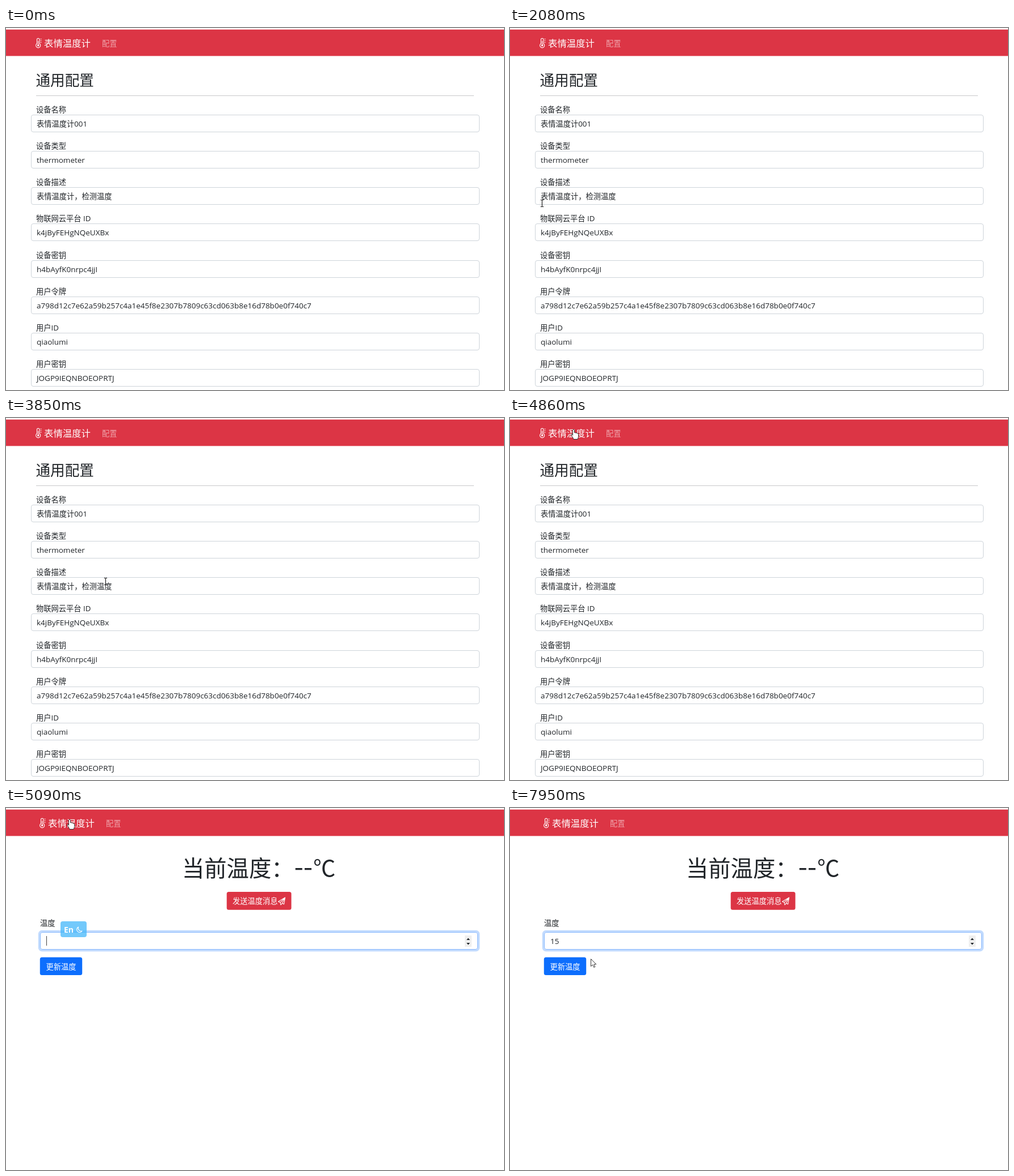
An HTML page for the animation above (8 s loop, 877 by 639 pixels).

```html
<!DOCTYPE html>
<html lang="zh-CN">
<head>
<meta charset="utf-8">
<style>
  html, body { margin: 0; width: 100%; height: 100%; overflow: hidden; background: #fff; }
  svg { display: block; font: 13.25px "Open Sans", "Noto Sans CJK SC", "Noto Sans CJK", sans-serif; fill: #212529; }
  text { white-space: pre; }
  .latin { font-size: 13.5px; }
  .title { font-family: "Noto Sans CJK SC", "Noto Sans CJK", sans-serif; font-weight: 350; }
  .white { fill: #fff; }
  .line { fill: none; stroke: #fff; stroke-width: 1.1; stroke-linejoin: round; stroke-linecap: round; }
  .cursor { fill: #fff; stroke: #222; stroke-width: .9; stroke-linejoin: round; }
</style>
</head>
<body>
<svg width="877" height="639" viewBox="0 0 877 639">
  <rect y="2.7" width="877" height="46.7" fill="#dc3545"/>
  <g id="nav" class="white">
    <path class="line" d="M54.5 27.5V20.5a2.2 2.2 0 0 1 4.4 0v7a4 4 0 1 1-4.4 0zM56.7 23v7M61 19.5h1M61 22.5h1M61 25.5h1"/>
    <circle cx="56.7" cy="30.8" r="1.7"/>
    <text x="67" y="33" font-size="16.4">表情温度计</text>
    <text x="169" y="32" fill-opacity=".55">配置</text>
  </g>

  <g id="config">
    <text class="title" x="52.5" y="101.5" font-size="25.6">通用配置</text>
    <path d="M53 119.5H824" stroke="#c8c9ca"/>
  </g>

  <g id="home">
    <g class="title" font-size="39.3">
      <text x="310" y="121">当前温度：</text>
      <text x="507.5" y="121" font-size="47">--</text>
      <text x="541" y="121">℃</text>
    </g>
    <rect x="388.7" y="148" width="113.8" height="31.7" rx="3.5" fill="#dc3545"/>
    <text class="white" x="399" y="169">发送温度消息</text>
    <path class="line" d="M491.5 158L479.5 165.2 483 166.8 484 171 486.3 168.3 489.5 169.7ZM483 166.8L491.5 158 486.3 168.3"/>
    <text x="60" y="208">温度</text>
    <rect id="ring" x="58.5" y="217.5" width="774" height="34" rx="5" fill="none" stroke="#c2dbfe" stroke-width="3.5"/>
    <rect id="field" x="60.5" y="219.5" width="770" height="30" rx="3.5" fill="#fff"/>
    <rect x="808" y="225" width="12" height="20" fill="#efefef"/>
    <path d="M811 233l3-3.5 3 3.5zM811 238l3 3.5 3-3.5z"/>
    <text id="typed" class="latin" x="71" y="240"></text>
    <path id="caret" d="M.5 226v17" stroke="#444"/>
    <rect x="59.8" y="263.5" width="74.4" height="31.5" rx="3.5" fill="#0d6efd"/>
    <text class="white" x="70.5" y="284.5">更新温度</text>
    <g id="badge">
      <rect x="96" y="200" width="46" height="28" rx="4" fill="#47b8fa" fill-opacity=".76"/>
      <text class="white" x="102" y="220" font-size="14" font-weight="700">En</text>
      <path class="line" d="M127.5 210a5 5 0 1 0 6.5 7a5.3 5.3 0 0 1-6.5-7z"/>
    </g>
  </g>

  <g id="pointer">
    <path id="arrow" class="cursor" d="M.5.5V13.5L3.6 10.7 5.7 15.3 7.8 14.4 5.8 9.9H9.8Z"/>
    <path id="beam" d="M-2.5-6h2l.5.5.5-.5h2M0-5.5v11M-2.5 6h2l.5-.5.5.5h2" fill="none" stroke="#000"/>
    <path id="hand" class="cursor" d="M-1.5 1.2Q0-1 1.5 1.2V6Q3 5 4 6.5 5.5 5.5 6.3 7.2 8.5 6.7 8.5 9V12.5Q8.5 14.5 7 17.5H0Q-1.2 14-4 10.5-4.5 8.5-3.2 8.2L-1.5 10.5Z"/>
  </g>
</svg>
<script>
const $ = id => document.getElementById(id);
const show = (id, on) => $(id).setAttribute('display', on ? 'inline' : 'none');
const move = (id, x, y) => $(id).setAttribute('transform', `translate(${x} ${y})`);

const LOOP = 8000, STEP = 77.1, PITCH = 64.15;
const HOME_AT = 4940, ORBIT_FROM = 520, ORBIT_TO = 3400, ORBIT = 1430;

const fields = [
  ['设备名称', '表情温度计001'],
  ['设备类型', 'thermometer'],
  ['设备描述', '表情温度计，检测温度'],
  ['物联网云平台 ID', 'k4jByFEHgNQeUXBx'],
  ['设备密钥', 'h4bAyfK0nrpc4jjI'],
  ['用户令牌', 'a798d12c7e62a59b257c4a1e45f8e2307b7809c63cd063b8e16d78b0e0f740c7'],
  ['用户ID', 'qiaolumi'],
  ['用户密钥', 'JOGP9IEQNBOEOPRTJ']
];
$('config').innerHTML += fields.map(([label, value], i) => {
  const y = Math.round(153 + PITCH * i);
  return `<text x="53" y="${y - 4.5}">${label}</text>
    <rect x="44.5" y="${y + .5}" width="789" height="30" rx="3.5" fill="#fff" stroke="#ced4da"/>
    <text x="54" y="${y + 21}" class="${/^\w+$/.test(value) ? 'latin' : ''}">${value}</text>`;
}).join('');

// Wide loops over the left half of the form
const orbit = t => [
  112 - 107 * Math.cos(2 * Math.PI * (t - 885) / ORBIT),
  317 - (t - ORBIT_FROM) / 220 + 148 * Math.sin(Math.PI * (t - 600) / ORBIT) ** 4
];

// Eased moves after the loops: start, end, destination
const glides = [
  [3460, 3850, [175.5, 288.5]],
  [3850, 4310, [112, 20]],
  [5320, 5550, [291, 190]],
  [5550, 5625, [205.5, 236.5]],
  [7640, 7945, [142, 266]]
];

function pointerAt(t) {
  if (t < ORBIT_FROM) return t >= 70 && t < 140 ? [389, 519] : null;
  const now = Math.max(ORBIT_FROM, Math.floor((t + 5) / STEP) * STEP);
  let at = orbit(Math.min(now, ORBIT_TO));
  for (const [start, end, to] of glides) {
    const k = Math.min(1, Math.max(0, (now - start) / (end - start)));
    at = at.map((v, i) => v + (to[i] - v) * k * k * (3 - 2 * k));
  }
  return at;
}

function shapeAt(x, y, home) {
  if (y < 49) return x > 52 && x < 150 ? 'hand' : 'arrow';
  const inField = home
    ? x > 60 && y > 219 && y < 251
    : x > 44 && y > 153 && (y - 153) % PITCH < 31;
  return inField ? 'beam' : 'arrow';
}

function draw(t) {
  const home = t >= HOME_AT;
  show('config', !home);
  show('home', home);
  move('nav', home ? 7 : 0, 0);

  const focus = Math.min(1, Math.max(0, (t - HOME_AT) / 150));
  $('ring').setAttribute('opacity', focus);
  $('field').setAttribute('stroke', focus < .5 ? '#ced4da' : '#86b7fe');

  const typed = t < 6800 ? '' : t < 6950 ? '1' : '15';
  $('typed').textContent = typed;
  show('caret', t >= 5090 && t < 5630 || t >= 6010 && t < 6550 || t >= 6800 && t < 7570);
  move('caret', 71 + 7.5 * typed.length, 0);
  show('badge', t >= 5090 && t < 7020);
  move('badge', t < 6870 ? 0 : 7.5, 0);

  const at = pointerAt(t);
  show('pointer', at);
  if (!at) return;
  const shape = shapeAt(...at, home);
  for (const id of ['arrow', 'beam', 'hand']) show(id, id === shape);
  move('pointer', ...at.map(v => shape === 'beam' ? Math.floor(v) + .5 : Math.round(v)));
}

function tick() {
  draw(performance.now() % LOOP);
  requestAnimationFrame(tick);
}
tick();
</script>
</body>
</html>
```
